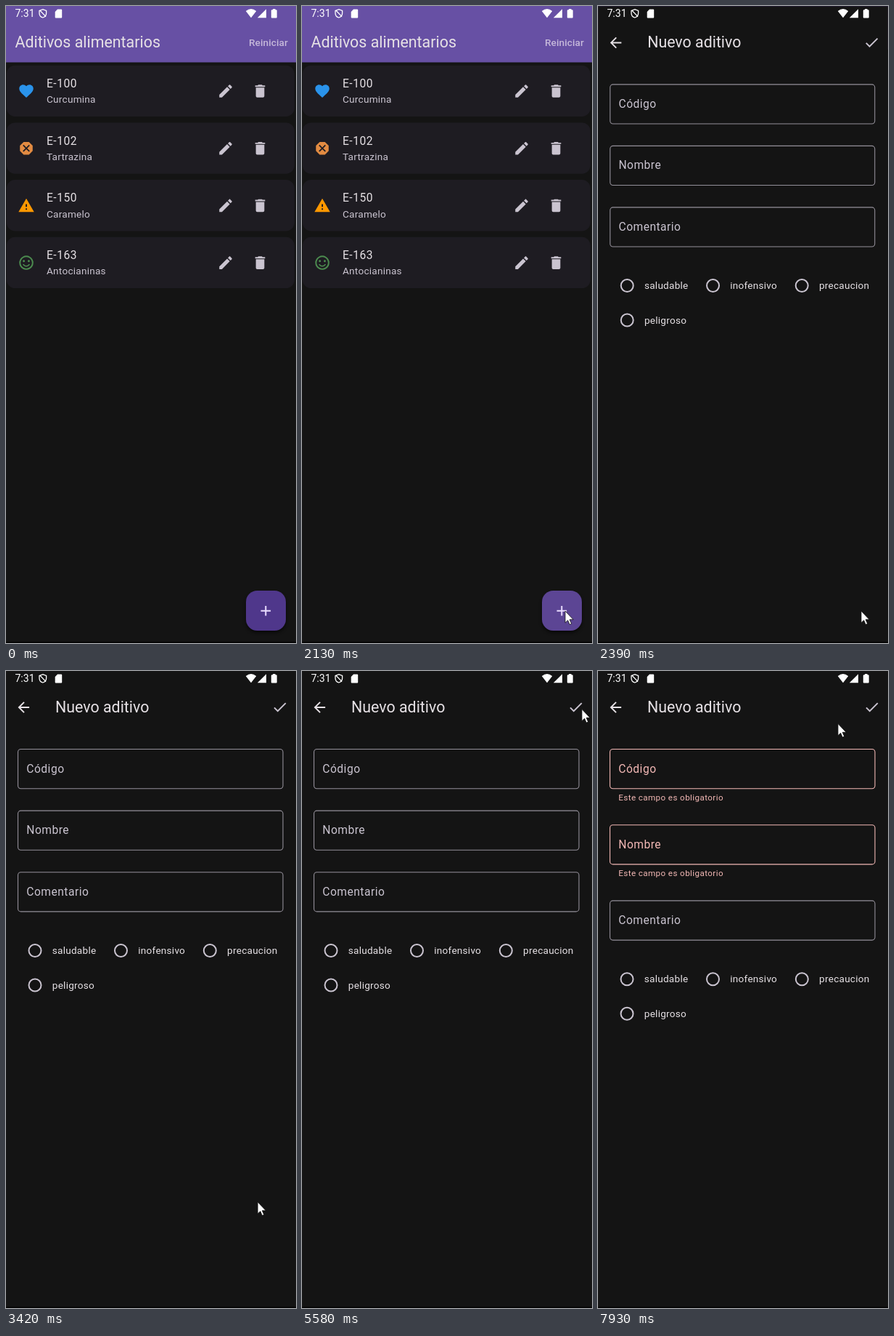
Recreate the animation shown at these times as an HTML page. Size 400 by 876 pixels, loop 8 s.

```html
<!DOCTYPE html>
<html lang="es">
<head>
<meta charset="utf-8">
<title>Aditivos alimentarios</title>
<style>
  html, body { margin: 0; width: 100%; height: 100%; overflow: hidden; background: #141414; }
  svg { display: block; width: 100vw; height: 100vh; }
  text { font-family: Roboto, sans-serif; fill: #e6e1e5; }
  .title { font-size: 21.4px; }
  .body { font-size: 15.6px; letter-spacing: .49px; }
  .small { font-size: 13.6px; letter-spacing: .24px; }
  .soft { fill: #cac4d0; }
  .error { font-size: 11.67px; letter-spacing: .39px; fill: #f2b8b5; }
</style>
</head>
<body>
<svg viewBox="0 0 400 876" xmlns="http://www.w3.org/2000/svg">
  <g id="list">
    <rect width="400" height="876" fill="#141414"/>
    <rect width="400" height="77.5" fill="#6750a4"/>
    <text class="title" x="12.5" y="57">Aditivos alimentarios</text>
    <text x="335" y="55" font-size="13.6" font-weight="500" letter-spacing=".1" style="fill:#c5b8da">Reiniciar</text>
    <g id="rows"></g>
    <rect x="331" y="807" width="55" height="55" rx="15.5" fill="#000" opacity=".55" filter="url(#blur)"/>
    <rect x="331" y="804" width="55" height="55" rx="15.5" fill="#4f378b"/>
    <rect id="press" x="331" y="804" width="55" height="55" rx="15.5" fill="#eaddff" opacity="0"/>
    <path d="M351.500 831.700h13.600M358.300 824.900v13.600" stroke="#eaddff" stroke-width="2"/>
  </g>
  <rect id="scrim" width="400" height="876" opacity="0"/>
  <g id="form">
    <rect width="400" height="876" fill="#141414"/>
    <circle id="splash" cx="377.700" cy="49.700" r="0" fill="#2f2d33"/>
    <g id="bar"></g>
    <text class="title" x="68" y="57">Nuevo aditivo</text>
    <g id="fields"></g>
    <g id="radios"></g>
  </g>
  <g id="status" fill="#fff">
    <text x="12.5" y="15" font-size="14" style="fill:#fff">7:31</text>
    <path d="M50.800 4.700L55.600 6.500V10C55.600 13 53.500 15.200 50.800 16C48.100 15.200 46 13 46 10V6.500ZM46.800 6L55 14.600" fill="none" stroke="#fff" stroke-width="1.300"/>
    <path d="M71 4.500h5.200q1 0 1 1v10q0 1-1 1h-7.500q-1 0-1-1v-7.500zM70.300 7.200v2M72.400 6v3.200M74.600 6v3.200"/>
    <path d="M338 16.300L330.800 7Q338 1.200 345.200 7ZM346.800 16.300H359V4.200ZM368 4h3.500v1.300h1.200q1 0 1 1v9.200q0 1-1 1h-5.900q-1 0-1-1v-9.200q0-1 1-1h1.200z"/>
  </g>
  <rect y="874.500" width="400" height="1.500" fill="#000"/>
  <path id="cursor" d="M0 0V16.200L3.700 12.800 6.200 18.600 8.700 17.500 6.200 11.800H11.200Z" fill="#fff" stroke="#111" stroke-width=".8"/>
  <defs><filter id="blur" x="-20%" y="-20%" width="140%" height="140%"><feGaussianBlur stdDeviation="2"/></filter></defs>
</svg>
<script>
const $ = id => document.getElementById(id);
const LOOP = 8000;
const ICONS = {
  heart: 'M12 21.35l-1.45-1.32C5.4 15.36 2 12.28 2 8.5 2 5.42 4.42 3 7.5 3c1.74 0 3.41.81 4.5 2.09C13.09 3.81 14.76 3 16.5 3 19.58 3 22 5.42 22 8.5c0 3.78-3.4 6.86-8.55 11.54z',
  danger: 'M15.73 3H8.27L3 8.27v7.46L8.27 21h7.46L21 15.73V8.27zM17 15.74L15.74 17 12 13.26 8.26 17 7 15.74 10.74 12 7 8.26 8.26 7 12 10.74 15.74 7 17 8.26 13.26 12z',
  warning: 'M1 21h22L12 2zm12-3h-2v-2h2zm0-4h-2v-4h2z',
  smile: 'M12 2a10 10 0 1 0 .01 0zm0 2a8 8 0 1 1-.01 0zM8.5 8a1.500 1.500 0 1 0 .01 0zM15.500 8a1.500 1.500 0 1 0 .01 0zM12 16c-1.480 0-2.750-.81-3.450-2H6.880c.8 2.050 2.790 3.500 5.120 3.500s4.320-1.450 5.120-3.500h-1.670c-.7 1.190-1.970 2-3.450 2z',
  edit: 'M3 17.25V21h3.75L17.81 9.94l-3.75-3.75zM20.71 7.04c.39-.39.39-1.02 0-1.41l-2.34-2.34c-.39-.39-1.02-.39-1.41 0l-1.83 1.83 3.75 3.75z',
  trash: 'M6 19c0 1.1.9 2 2 2h8c1.1 0 2-.9 2-2V7H6zM19 4h-3.5l-1-1h-5l-1 1H5v2h14z',
  back: 'M20 11H7.83l5.59-5.59L12 4l-8 8 8 8 1.41-1.41L7.83 13H20z',
  check: 'M9 16.17L4.83 12l-1.42 1.41L9 19 21 7l-1.41-1.41z'
};
const icon = (name, x, y, color = '#cac4d0') =>
  `<path d="${ICONS[name]}" fill="${color}" fill-rule="evenodd" transform="translate(${x} ${y}) scale(.975) translate(-12 -12)"/>`;

$('rows').innerHTML = [
  ['E-100', 'Curcumina', 'heart', '#2a93eb'],
  ['E-102', 'Tartrazina', 'danger', '#e28b42'],
  ['E-150', 'Caramelo', 'warning', '#ff9800'],
  ['E-163', 'Antocianinas', 'smile', '#4c8c4f']
].map(([code, name, mark, color], i) => `<g transform="translate(0 ${i * 78.7})">
  <rect x=".8" y="81.700" width="397" height="70.300" rx="11.700" fill="#1e1c22"/>
  ${icon(mark, 28, 117, color)}
  <text class="body" x="56" y="112">${code}</text>
  <text class="small soft" x="56" y="133.300">${name}</text>
  ${icon('edit', 303, 117)}${icon('trash', 350.5, 117)}</g>`).join('');

$('bar').innerHTML = icon('back', 24.3, 50, '#e6e1e5') + icon('check', 377.7, 49.7);

$('fields').innerHTML = ['Código', 'Nombre', 'Comentario'].map((label, i) => `<g>
  <rect x="16.500" y="107.500" width="365.500" height="54.200" rx="4" fill="none" stroke-width="1.100"/>
  <text class="body" x="28.300" y="139.600">${label}</text>
  ${i < 2 ? '<text class="error" x="28.300" y="178">Este campo es obligatorio</text>' : ''}</g>`).join('');

$('radios').innerHTML = [
  ['saludable', 40, 384.5], ['inofensivo', 158.5, 384.5], ['precaucion', 281.3, 384.5], ['peligroso', 40, 432]
].map(([label, x, y]) => `<circle cx="${x}" cy="${y}" r="8.500" fill="none" stroke="#cac4d0" stroke-width="2"/>
  <text class="small" x="${x + 23.8}" y="${y + 4.8}">${label}</text>`).join('');

const fields = [...$('fields').children];
const progress = (t, from, to) => Math.min(1, Math.max(0, (t - from) / (to - from)));
const mix = (a, b, k) => `rgb(${a.map((v, i) => Math.round(v + (b[i] - v) * k))})`;
const OUTLINE = [147, 143, 153], LABEL = [202, 196, 208], ERROR = [242, 184, 181];

// time, x, y of the pointer tip
const TRACK = [
  [1060, 394, 841], [1300, 372, 835], [1530, 363, 832], [2670, 363, 832], [2790, 361, 829],
  [3010, 361, 829], [3450, 345, 715], [3830, 350, 620], [4320, 304, 263], [4480, 302, 195],
  [4700, 326, 145], [5100, 358, 92], [5560, 386, 52.5], [7590, 386, 52.5], [7910, 331, 72.5]
];
function pointerAt(t) {
  const next = TRACK.findIndex(key => key[0] > t);
  if (next < 0) return TRACK[TRACK.length - 1].slice(1);
  const a = TRACK[Math.max(0, next - 1)], b = TRACK[next];
  const k = progress(t, a[0], b[0]);
  return [a[1] + (b[1] - a[1]) * k, a[2] + (b[2] - a[2]) * k];
}

function zoomIn(t) {
  if (t < 1 / 6) return .4 * (t * 6) ** 3;
  return 1 - .6 * (1 - (t - 1 / 6) * 1.2) ** 5;
}

function render(time) {
  // the screen refreshes about fifteen times a second
  const t = Math.floor((time + 3) / 66.4) * 66.5;

  $('press').setAttribute('opacity', .08 * progress(t, 1930, 2100));
  const open = progress(t, 2200, 2500);
  const scale = .85 + .15 * zoomIn(open);
  const about = s => `translate(200 438) scale(${s}) translate(-200 -438)`;
  $('form').setAttribute('transform', about(scale));
  $('form').setAttribute('opacity', progress(open, .125, .25));
  $('list').setAttribute('transform', about(1 + .05 * (open && zoomIn(open))));
  $('scrim').setAttribute('opacity', .6 * progress(open, .2075, .4175));

  $('splash').setAttribute('r', 19.5 * progress(t, 6190, 6400));
  $('splash').setAttribute('opacity', 1 - progress(t, 6480, 6840));

  const shift = t >= 6400 ? 19.6 : 0;
  const shown = progress(t, 6415, 6585);
  fields.forEach((field, i) => {
    const [box, label, error] = field.children;
    const k = error ? shown : 0;
    field.setAttribute('transform', `translate(0 ${i * (84.6 + shift)})`);
    box.setAttribute('stroke', mix(OUTLINE, ERROR, error && shift ? .2 + .8 * k : 0));
    label.style.fill = mix(LABEL, ERROR, k);
    if (error) {
      error.setAttribute('opacity', k);
      error.setAttribute('transform', `translate(0 ${-3.5 * (1 - k)})`);
    }
  });
  $('radios').setAttribute('transform', `translate(0 ${shift * 2})`);

  const [x, y] = pointerAt(t);
  $('cursor').setAttribute('transform', `translate(${x} ${y})`);
  $('cursor').setAttribute('visibility', t < 1060 ? 'hidden' : 'visible');
}

const start = performance.now();
function tick() {
  render((performance.now() - start) % LOOP);
  requestAnimationFrame(tick);
}
render(0);
requestAnimationFrame(tick);
</script>
</body>
</html>
```
